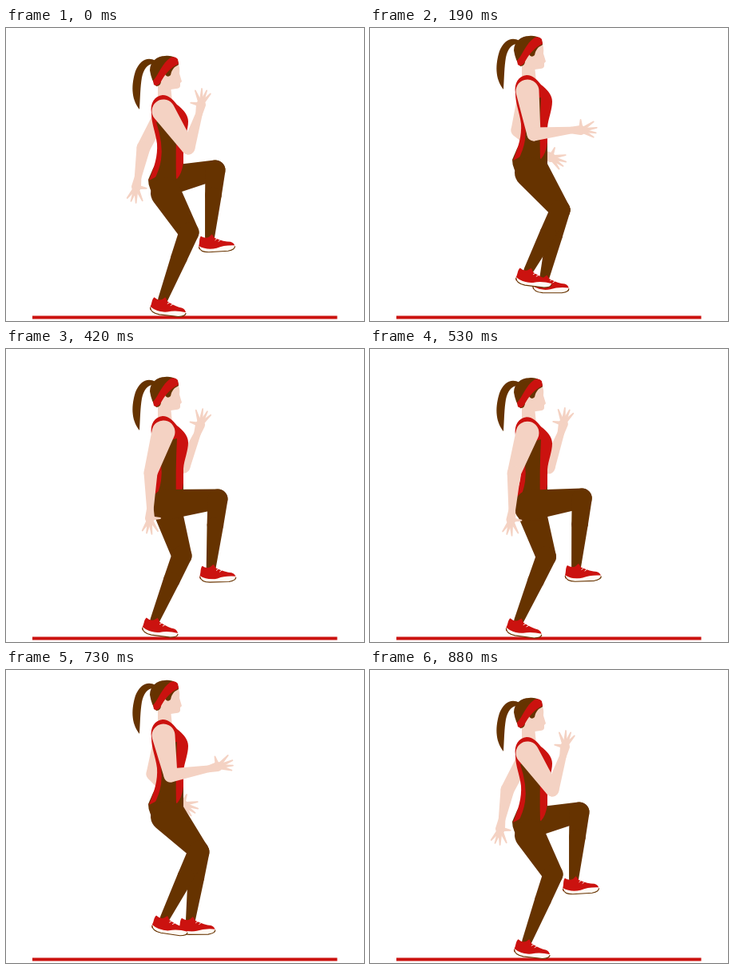
Animation of 448x367 px, one loop 1030 ms. Source, as an HTML page with a canvas:

```html
<!DOCTYPE html>
<html lang="en">
<head>
<meta charset="utf-8">
<title>High knees</title>
<style>
html, body { margin: 0; width: 100%; height: 100%; overflow: hidden; background: #fff; }
canvas { display: block; width: 448px; height: 367px; }
</style>
</head>
<body>
<canvas id="stage"></canvas>
<script>
const RED = '#cb120f', BROWN = '#663300', SKIN = '#f4d2c3', CREAM = '#fffaf4';
const LOOP = 1030, RAD = Math.PI / 180;
const canvas = document.getElementById('stage');
const ctx = canvas.getContext('2d');
const dpr = window.devicePixelRatio || 1;
canvas.width = 448 * dpr;
canvas.height = 367 * dpr;

// Pose: body y | near arm, far arm: elbow, palm, hand angle
//              | near leg, far leg: knee, heel, shoe angle
const kneeUpFar = [0, 228,150,244,96,-78, 172,150,163,199,100, 229,256,180,357,4, 262,178,242,281,-6];
const passDown = [-25, 205,133,264,128,0, 185,128,226,162,25, 238,228,182,320,5, 238,228,204,331,-2];
const reach = [-15, 191,147,224,190,42, 207,137,257,111,-30, 262,200,223,302,4, 214,245,174,347,2];
const kneeUpNear = [0, 181,155,180,212,92, 222,147,243,95,-72, 265,188,243,292,-4, 220,259,170,356,5];
const lower = [-22, 194,142,237,174,20, 207,130,255,123,-8, 257,207,209,309,5, 212,241,175,342,3];
const passUp = [-22, 206,132,265,121,-14, 184,130,221,168,25, 241,226,182,327,6, 242,228,217,331,-3];
const settle = kneeUpNear.map((v, i) => v + 0.08 * (v - reach[i]));

const keys = [[0, kneeUpFar], [190, passDown], [300, reach], [420, kneeUpNear],
  [530, settle], [630, lower], [730, passUp], [880, kneeUpFar]];
const rests = [0, 4, 7];   // keys where the motion stops
const flights = [1, 5];    // segments around the top of each hop
const steps = [0, 20, 50, 80, 110, 150, 190, 220, 260, 300, 330, 360, 390, 420, 450, 490, 530,
  580, 630, 680, 730, 780, 800, 820, 840, 850, 865, 880];

function slope(k, j) {
  if (rests.includes(k)) return 0;
  const [t0, a] = keys[k - 1], [t1, b] = keys[k + 1];
  return (b[j] - a[j]) / (t1 - t0);
}

function poseAt(t) {
  if (t >= 880) return { pose: kneeUpFar, lift: 0 };
  let k = 0;
  while (t >= keys[k + 1][0]) k++;
  const [t0, a] = keys[k], [t1, b] = keys[k + 1];
  const d = t1 - t0, u = (t - t0) / d, w = 1 - u;
  const pose = a.map((v, j) =>
    v * w * w * (1 + 2 * u) + b[j] * u * u * (3 - 2 * u) +
    d * u * w * (w * slope(k, j) - u * slope(k + 1, j)));
  return { pose, lift: flights.includes(k) ? 6 * (4 * u * w) ** 2 : 0 };
}

// Chain of circles [x, y, r] joined by their outer tangents
function limb(color, ...dots) {
  ctx.fillStyle = color;
  for (let i = 1; i < dots.length; i++) {
    const [x1, y1, r1] = dots[i - 1], [x2, y2, r2] = dots[i];
    const a = Math.atan2(y2 - y1, x2 - x1);
    const b = Math.acos((r1 - r2) / Math.max(Math.hypot(x2 - x1, y2 - y1), Math.abs(r1 - r2) + 0.01));
    ctx.beginPath();
    ctx.arc(x1, y1, r1, a + b, a - b + 2 * Math.PI);
    ctx.arc(x2, y2, r2, a - b, a + b);
    ctx.fill();
  }
}

function shape(color, d) {
  ctx.fillStyle = color;
  ctx.fill(new Path2D(d));
}

function polar(x, y, deg, r) {
  return [x + r * Math.cos(deg * RAD), y + r * Math.sin(deg * RAD)];
}

function arm(shoulder, [ex, ey, px, py, dir]) {
  const wrist = [...polar(px, py, dir, -12), 4.3];
  limb(SKIN, shoulder, [ex, ey, 8.5], wrist, [px, py, 6]);
  for (const [off, len] of [[-34, 19], [-9, 20], [10, 19], [29, 18], [-92, 13]]) {
    limb(SKIN, [...polar(px, py, dir + off, 4), 2.4], [...polar(px, py, dir + off, len), 0.9]);
  }
}

function shoe(x, y, deg) {
  ctx.save();
  ctx.translate(x, y);
  ctx.rotate(deg * RAD);
  shape(RED, 'M0-8C2-12 1-17 4-20Q9-16 14-18L18-21 21-16Q32-10 40-9Q45-7 45-2L38 0 0-4Z');
  const sole = new Path2D('M0-8Q10-1 22-3Q32-6 45-4Q46 1 36 2L12 1Q1 0 0-8Z');
  ctx.fillStyle = CREAM;
  ctx.fill(sole);
  ctx.strokeStyle = BROWN;
  ctx.lineWidth = 1.2;
  ctx.stroke(new Path2D('M0-7Q1 0 12 1L36 2Q45 1 45-3'));
  ctx.strokeStyle = CREAM;
  ctx.lineWidth = 0.9;
  ctx.stroke(new Path2D('M21-13l3-2M25-11l3-2'));
  ctx.restore();
}

function leg(hip, [kx, ky, hx, hy, deg]) {
  const c = Math.cos(deg * RAD), s = Math.sin(deg * RAD);
  const ax = hx + 15 * c + 18 * s, ay = hy + 15 * s - 18 * c;
  const calf = [kx + (ax - kx) * 0.38, ky + (ay - ky) * 0.38, 10.3];
  limb(BROWN, hip, [kx, ky, 12.5], calf, [ax, ay, 6]);
  shoe(hx, hy, deg);
}

function torso(y) {
  ctx.save();
  ctx.translate(0, y);
  shape(BROWN, 'M184 176L178 190Q178 202 188 213L215 213 222 198 222 168 190 165Z');
  shape(SKIN, 'M190 66L190 92 208 92 206 72Z');
  shape(RED, 'M182 107C180 94 186 85 196 84C204 84 209 90 214 96C222 102 228 109 228 117' +
    'C228 128 223 138 222 150L222 168Q220 183 214 189L200 180 179 191C186 173 190 160 189 145C187 130 182 120 182 107Z');
  shape(BROWN, 'M188 118Q197 145 194 165Q192 178 185 191L213 191Q212 150 214 112Z');
  ctx.restore();
}

function head(y) {
  ctx.save();
  ctx.translate(0, y);
  shape(BROWN, 'M187 41C177 35 167 41 162 54C157 70 156 88 167 102C168 86 168 74 170 62C172 52 177 45 184 45Z');
  shape(SKIN, 'M190 55L215 44Q218 49 217 57L220 67 218 69 218 73Q217 76 213 76L206 77 190 72Z');
  shape(BROWN, 'M180 53C180 42 189 35 199 35C208 34 216 37 216 46L211 49Q207 53 206 59Q202 63 199 58L194 66Q194 73 188 73Q182 66 180 53Z');
  shape(RED, 'M184 66C191 59 195 44 206 37Q212 35 215 39L216 45C206 49 198 59 193 69Q189 74 185 71Z');
  ctx.restore();
}

function draw(t) {
  const { pose, lift } = poseAt(t);
  const y = pose[0];
  const nearLeg = pose.slice(11, 16);
  const drop = (nearLeg[1] - y - 188) * 0.17;
  ctx.setTransform(dpr, 0, 0, dpr, 0, 0);
  ctx.fillStyle = '#fff';
  ctx.fillRect(0, 0, 448, 367);
  ctx.fillStyle = RED;
  ctx.fillRect(33, 360.5, 381.5, 4);
  ctx.translate(0, -lift);
  arm([194, 108 + y, 9], pose.slice(6, 11));
  leg([199, 192 + y, 19], pose.slice(16));
  torso(y);
  head(y);
  leg([200, 195 + drop + y, 19], nearLeg);
  arm([197, 104 + y, 14.5], pose.slice(1, 6));
}

function frame() {
  const t = performance.now() % LOOP;
  draw(steps.findLast(s => s <= t));
  requestAnimationFrame(frame);
}
frame();
</script>
</body>
</html>
```
